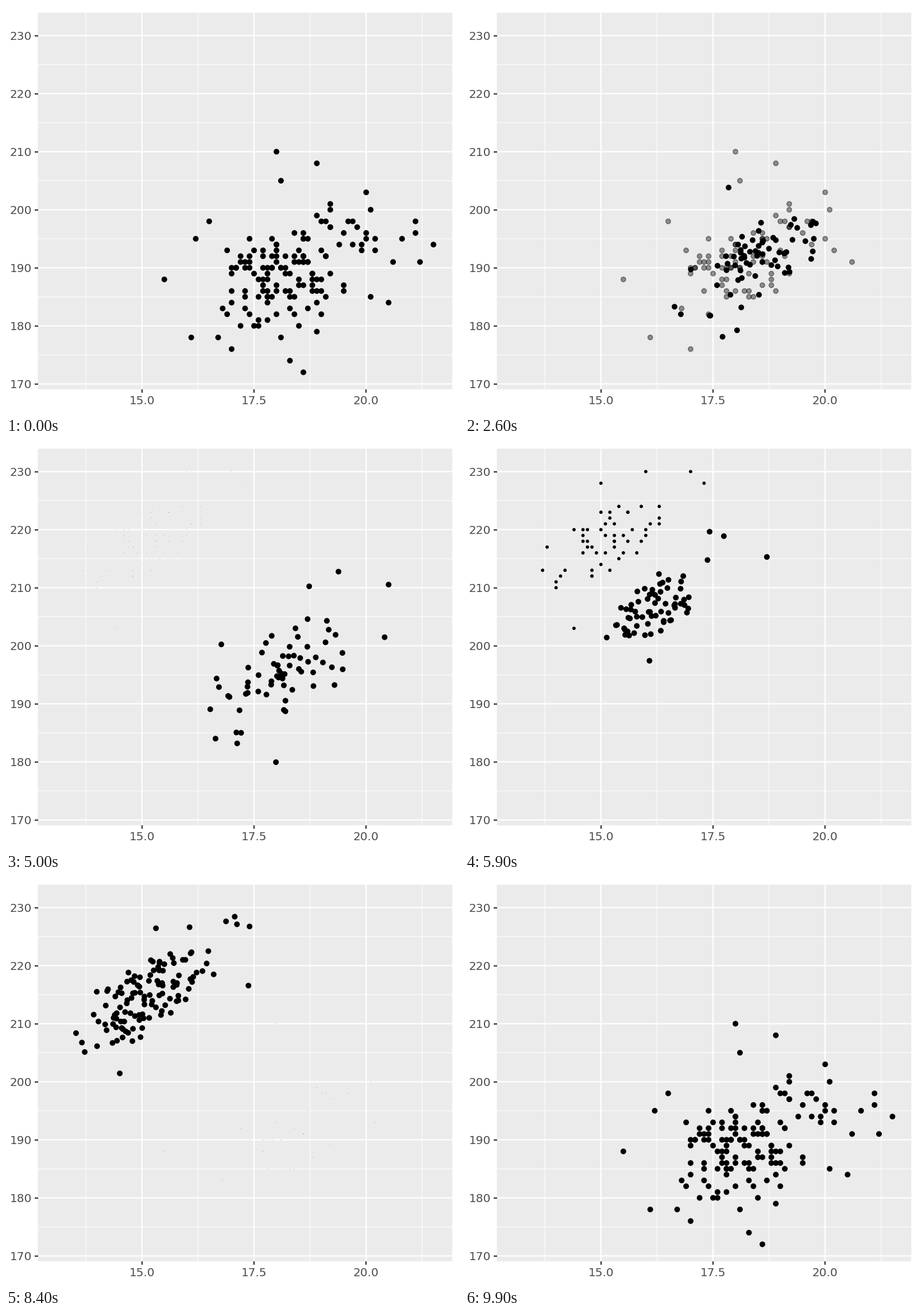
Write a matplotlib script that moves like this. It is 789 px wide and 710 px high and loops after 10000 ms.

```python
import numpy as np
import matplotlib.pyplot as plt
from matplotlib.animation import FuncAnimation

W, H, DPI = 789, 710, 100
FRAMES, STEP = 100, 100
PX = 72 / DPI  # points per pixel

plt.rcParams.update({"font.family": "DejaVu Sans", "path.snap": False})
rng = np.random.default_rng(11)


def fill(n, depth, base, slope, spread):
    """Random birds around a depth/length trend, rounded like measurements."""
    d = rng.triangular(*depth, n)
    length = base + slope * (d - depth[1]) + rng.triangular(-spread, 0, spread, n)
    return np.column_stack([d.round(1), length.round()])


# Outlying birds: depth and length in each of the three states.
PATHS = np.array([
    (21.2, 191, 18.1, 201, 14.6, 213),
    (21.1, 198, 17.1, 190, 14.6, 210),
    (21.5, 194, 18.2, 195, 15.1, 222),
    (18.3, 174, 17.3, 181, 14.3, 218),
    (18.6, 172, 17.8, 191, 14.3, 210),
    (16.7, 178, 16.6, 187, 15.3, 222),
    (18.1, 178, 20.8, 201, 14.2, 209),
    (21.1, 196, 16.8, 199, 16.3, 220),
    (18.5, 180, 20.7, 210, 17.3, 219),
    (18.9, 179, 19.6, 212, 15.9, 225),
    (16.2, 195, 19, 210, 14.4, 214),
    (17.8, 181, 18.2, 178, 14.6, 211),
    (18.9, 184, 18.8, 203, 17, 230),
    (18, 192, 18.2, 193, 16.8, 230),
])
LEAVERS = [(18.9, 208), (18.1, 205), (20, 203), (16.1, 178), (17, 176), (16.5, 198)]
RETURNERS = [(18, 210), (15.5, 188), (20.1, 200)]
TALL = [(17.3, 228), (17, 230), (15, 228), (14.4, 203), (16, 230)]
GAP = [(np.nan, np.nan)]  # a bird that was never measured

small = np.vstack([PATHS[:, :2], fill(53, (16.5, 18.4, 21), 188, 1.5, 9), GAP,
                   LEAVERS, fill(75, (16.4, 18, 20.7), 191, 1.6, 9), RETURNERS])
middle = np.vstack([PATHS[:, 2:4], fill(54, (16.2, 18.7, 20.2), 196, 4, 9)])
large = np.vstack([PATHS[:, 4:], fill(54, (13, 14.5, 16.4), 214, 4, 8),
                   TALL, fill(50, (13.6, 15, 16.6), 217, 4, 7), GAP])
STATES = [small, middle, large]
# (first frame, last frame) of each move to the next state
MOVES = [(16, 33), (49, 66), (83, 99)]


def pose(frame):
    """Positions, scale and opacity of every dot."""
    for i, (start, end) in enumerate(MOVES):
        a, b = STATES[i], STATES[(i + 1) % 3]
        if frame <= start:
            return a, np.ones(len(a)), np.ones(len(a))
        if frame < end:
            t = (frame - start) / (end - start)
            n = min(len(a), len(b))
            xy = np.vstack([a[:n] + (b[:n] - a[:n]) * t, a[n:], b[n:]])
            scale, alpha = np.ones(len(xy)), np.ones(len(xy))
            scale[len(a):] = t       # newcomers grow
            alpha[n:len(a)] = 1 - t  # leavers fade
            return xy, scale, alpha
    return pose(0)


fig = plt.figure(figsize=(W / DPI, H / DPI), dpi=DPI, facecolor="white")
left, right, top, bottom = 55.5, 777.3, 11.6, 667.2
ax = fig.add_axes([left / W, 1 - bottom / H, (right - left) / W, (bottom - top) / H],
                  facecolor="#EBEBEB")
ax.set(xlim=(12.68, 21.92), ylim=(169.05, 233.95))
ax.set_xticks([15, 17.5, 20], ["15.0", "17.5", "20.0"])
ax.set_yticks(range(170, 231, 10))
ax.set_xticks(np.arange(13.75, 21.5, 2.5), minor=True)
ax.set_yticks(range(175, 226, 10), minor=True)
ax.tick_params(length=5.8 * PX, width=2.2 * PX, color="#333333", pad=4.6 * PX,
               labelsize=20 * PX, labelcolor="#4D4D4D")
ax.tick_params(which="minor", length=0)
ax.grid(which="major", color="white", lw=2.25 * PX)
ax.grid(which="minor", color="white", lw=1.1 * PX)
ax.set_axisbelow(True)
for spine in ax.spines.values():
    spine.set_visible(False)

dots = ax.scatter([], [], zorder=3)


def draw(frame):
    xy, scale, alpha = pose(frame)
    ink = np.zeros((len(xy), 4))
    ink[:, 3] = alpha
    dots.set_offsets(xy)
    dots.set_sizes((8.4 * PX * scale) ** 2)
    dots.set_linewidths(1.5 * PX * scale)
    dots.set_facecolors(ink)
    dots.set_edgecolors(ink)
    return (dots,)


anim = FuncAnimation(fig, draw, frames=FRAMES, interval=STEP, repeat=True,
                     repeat_delay=0, blit=False)
plt.show()
```
